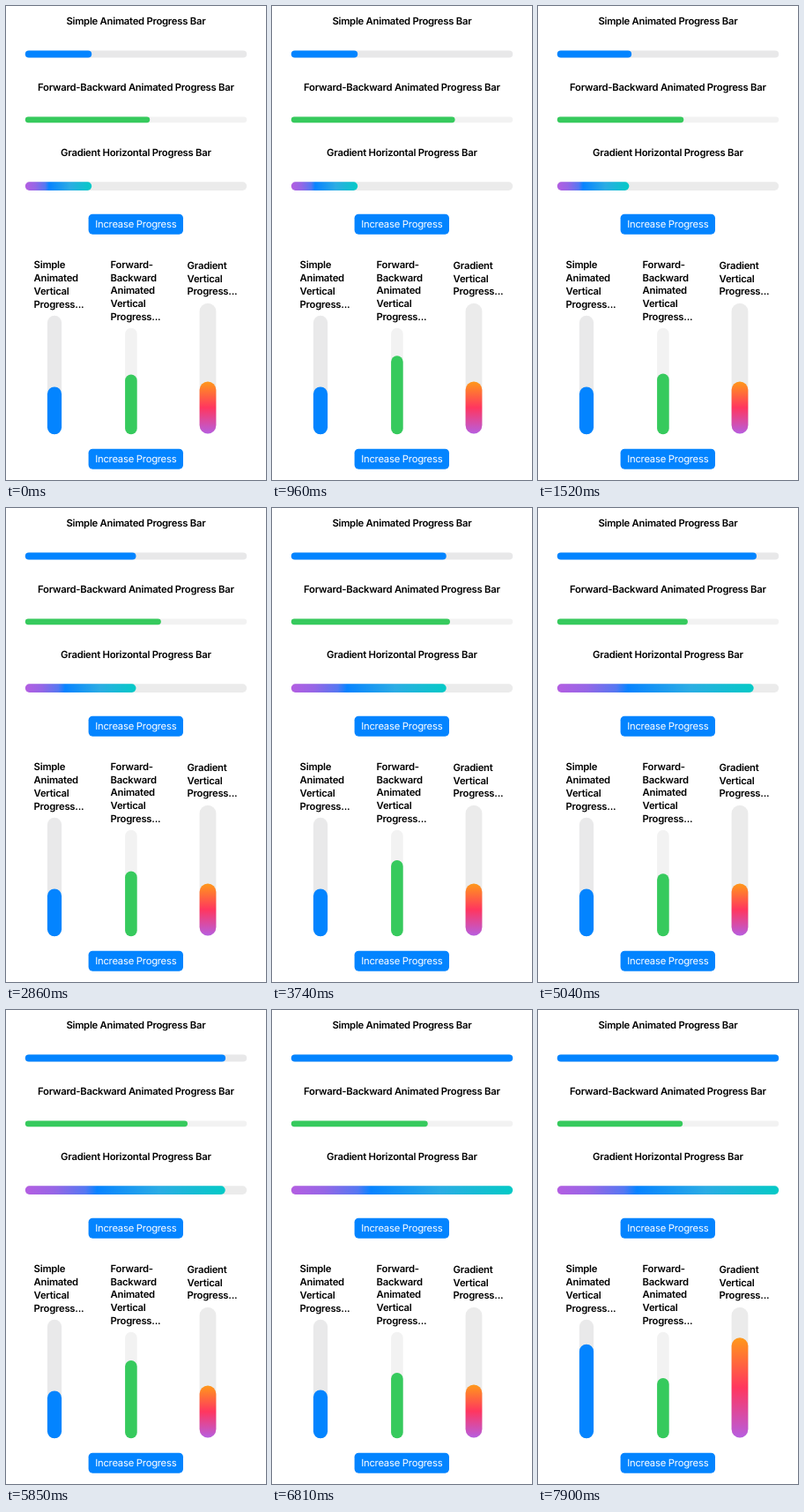
Recreate the animation shown at these times as an HTML page with a canvas. Size 295 px wide and 537 px high, loop 8000 ms.

```html
<!DOCTYPE html>
<html lang="en">
<head>
<meta charset="utf-8">
<title>Progress bars</title>
<style>
  html, body { margin: 0; width: 100%; height: 100%; overflow: hidden; background: #fff; }
  canvas, svg { position: absolute; left: 0; top: 0; width: 295px; height: 537px; }
  text {
    font: 600 11.3px Inter, "Open Sans", sans-serif;
    letter-spacing: -0.26px;
    text-rendering: geometricPrecision;
    fill: #000;
  }
  .mid { text-anchor: middle; }
  .label { font-weight: 400; fill: #fff; }
</style>
</head>
<body>
<canvas id="stage"></canvas>
<svg id="copy" viewBox="0 0 295 537"></svg>
<script>
const W = 295, H = 537, LOOP = 8000;
const canvas = document.getElementById('stage');
const copy = document.getElementById('copy');
const ctx = canvas.getContext('2d');
const dpr = window.devicePixelRatio || 1;
canvas.width = W * dpr;
canvas.height = H * dpr;

const BLUE = '#0384ff', GREEN = '#36ca5d';
const COOL = [[0, '#b45ee2'], [0.15, '#9566e6'], [0.3, '#5577f2'], [0.36, '#0783ff'],
  [0.67, '#2bace4'], [1, '#04cac6']];
const WARM = [[0, '#ff991a'], [0.5, '#ff365f'], [1, '#b75ee0']];

function addText(str, x, y, cls) {
  const el = document.createElementNS('http://www.w3.org/2000/svg', 'text');
  el.setAttribute('x', x);
  el.setAttribute('y', y);
  el.setAttribute('class', cls);
  el.textContent = str;
  copy.append(el);
}

function addColumn(x, y, lines) {
  lines.forEach((line, i) => addText(line, x, y + i * 14.75, ''));
}

addText('Simple Animated Progress Bar', 147.4, 21, 'mid');
addText('Forward-Backward Animated Progress Bar', 147.4, 96, 'mid');
addText('Gradient Horizontal Progress Bar', 147.4, 170.2, 'mid');
addColumn(31.6, 297.3, ['Simple', 'Animated', 'Vertical', 'Progress...']);
addColumn(118.6, 296.8, ['Forward-', 'Backward', 'Animated', 'Vertical', 'Progress...']);
addColumn(205.6, 297.8, ['Gradient', 'Vertical', 'Progress...']);
addText('Increase Progress', 147.3, 251.3, 'mid label');
addText('Increase Progress', 147.3, 517.4, 'mid label');

const mix = (a, b, u) => a + (b - a) * u;
const clamp = u => Math.min(1, Math.max(0, u));

// cubic-bezier(.42, 0, .58, 1)
function easeInOut(s) {
  let lo = 0, hi = 1;
  for (let i = 0; i < 24; i++) {
    const k = (lo + hi) / 2, r = 1 - k;
    if (1.26 * k * r * r + 1.74 * k * k * r + k * k * k < s) lo = k; else hi = k;
  }
  return lo * lo * (3 - 2 * lo);
}

// each tap: [time, amount added]
const taps = {
  across: { from: 0.3, list: [[1375, 0.2], [3000, 0.2], [4550, 0.2], [5780, 0.1]] },
  up: { from: 0.4, list: [[6740, 0.2], [7470, 0.2]] }
};

const level = ({ from, list }, t, duration) => list.reduce(
  (sum, [at, add]) => sum + add * easeInOut(clamp((t - at) / duration)), from);

const pressed = ({ list }, t) => list.some(([at]) => t >= at - 110 && t < at);

// swing phase in cycles over time
const swing = [[0, 0], [1520, 0.925], [2860, 1.82], [4510, 2.82], [5850, 3.605],
  [6810, 4.185], [7900, 4.948], [8000, 5.012]];

function swingLevel(t) {
  const i = swing.findIndex(([at]) => t < at);
  const [t0, p0] = swing[i - 1], [t1, p1] = swing[i];
  const half = mix(p0, p1, (t - t0) / (t1 - t0)) * 2 % 2;
  return mix(0.5625, 0.75, easeInOut(half < 1 ? half : 2 - half));
}

function box(x, y, w, h, r, paint) {
  ctx.fillStyle = paint;
  ctx.beginPath();
  ctx.roundRect(x, y, w, h, r);
  ctx.fill();
}

function blend(stops, x0, y0, x1, y1) {
  const g = ctx.createLinearGradient(x0, y0, x1, y1);
  stops.forEach(([at, color]) => g.addColorStop(at, color));
  return g;
}

function barAcross(y, h, track, value, paint) {
  const x = 21.8, full = 251.4, w = full * value;
  box(x, y, full, h, h / 2, track);
  box(x, y, w, h, h / 2, Array.isArray(paint) ? blend(paint, x, 0, x + w, 0) : paint);
}

function barUp(x, w, top, bottom, track, value, paint) {
  const full = bottom - top, h = full * value, y = bottom - h;
  box(x, top, w, full, w / 2, track);
  box(x, y, w, h, w / 2, Array.isArray(paint) ? blend(paint, 0, y, 0, bottom) : paint);
}

function button(y, down) {
  box(93.6, y, 107.4, 23, 4.6, down ? '#3b9eff' : BLUE);
}

function draw(t) {
  ctx.setTransform(dpr, 0, 0, dpr, 0, 0);
  ctx.fillStyle = '#fff';
  ctx.fillRect(0, 0, W, H);

  const wave = swingLevel(t);
  barAcross(50.4, 8.2, '#e8e8e9', level(taps.across, t, 500), BLUE);
  barAcross(125.4, 6.8, '#f2f2f2', wave, GREEN);
  barAcross(199.3, 9.6, '#ebebeb', level(taps.across, t, 600), COOL);
  button(235.7, pressed(taps.across, t));

  barUp(46.9, 16.2, 350.8, 485.3, '#e9e9ea', level(taps.up, t, 500), BLUE);
  barUp(135.1, 13.6, 364.8, 485.3, '#f2f2f2', wave, GREEN);
  barUp(219.6, 18.8, 336.8, 484.5, '#ebebeb', level(taps.up, t, 600), WARM);
  button(501.7, pressed(taps.up, t));
}

const start = performance.now();
function tick() {
  draw((performance.now() - start) % LOOP);
  requestAnimationFrame(tick);
}
tick();
</script>
</body>
</html>
```
